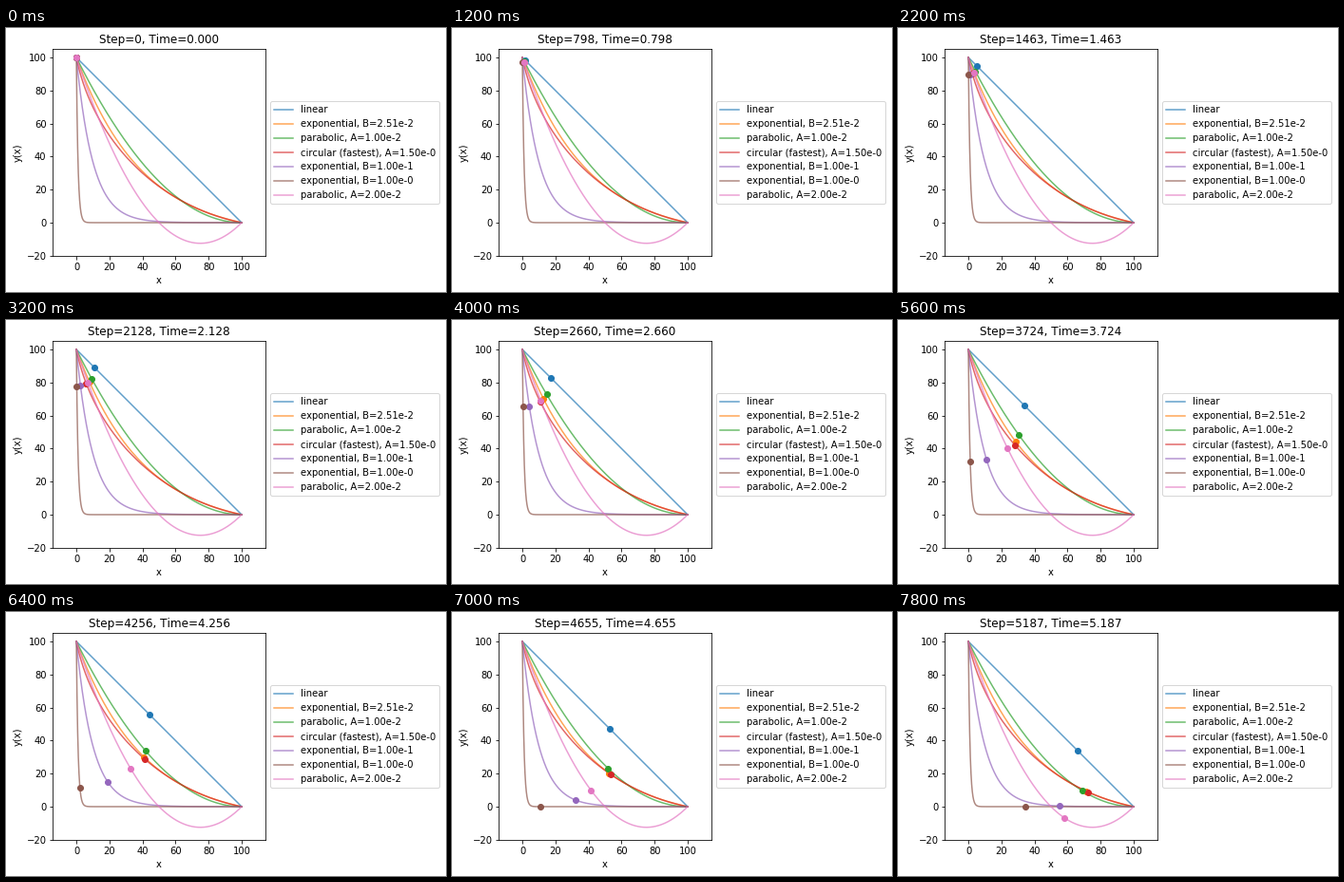
Write a matplotlib script that moves like this. It is 463 px wide and 278 px high and loops after 8000 ms.

```python
import numpy as np
import matplotlib.pyplot as plt
from matplotlib.animation import FuncAnimation

plt.rcParams["text.kerning_factor"] = 6

W, H, DPI = 463, 278, 72
G = 9.81
L = 100.0            # start height and horizontal run
STEPS, DT = 133, 0.001
FRAMES, INTERVAL = 40, 200


def linear(x):
    return L - x


def exponential(b):
    end = np.exp(-b * L)
    return lambda x: L * (np.exp(-b * x) - end) / (1 - end)


def parabolic(a):
    return lambda x: a * x**2 - (1 + a * L) * x + L


def circular(a):
    c = L / 2 * (1 + a)
    r2 = c**2 + (c - L)**2
    return lambda x: c - np.sqrt(r2 - (x - c)**2)


CURVES = [
    ("linear", linear),
    ("exponential, B=2.51e-2", exponential(0.0251)),
    ("parabolic, A=1.00e-2", parabolic(0.01)),
    ("circular (fastest), A=1.50e-0", circular(1.5)),
    ("exponential, B=1.00e-1", exponential(0.1)),
    ("exponential, B=1.00e-0", exponential(1.0)),
    ("parabolic, A=2.00e-2", parabolic(0.02)),
]


def travel(y):
    """Time and x samples of a bead sliding without friction from rest."""
    x = np.linspace(0, np.sqrt(L), 20001)**2
    h = y(x)
    ds = np.hypot(np.diff(x), np.diff(h))
    v = np.sqrt(2 * G * np.maximum(L - h, 0))
    # exact for constant acceleration along each short segment
    t = np.concatenate([[0], np.cumsum(2 * ds / (v[1:] + v[:-1]))])
    return t, x


fig = plt.figure(figsize=((W + 0.01) / DPI, (H + 0.01) / DPI), dpi=DPI,
                 facecolor="white")
ax = fig.add_axes([49.4 / W, 38.23 / H, 223.2 / W, 217.44 / H])
half = 62.5 * 223.2 / 217.44
ax.set_xlim(50 - half, 50 + half)
ax.set_ylim(-20, 105)
ax.set_xticks(range(0, 101, 20))
ax.set_yticks(range(-20, 101, 20))
ax.set_xlabel("x")
ax.set_ylabel("y(x)")
title = ax.set_title("")

xs = np.linspace(0, L, 1001)
for i, (name, y) in enumerate(CURVES):
    ax.plot(xs, y(xs), color=f"C{i}", alpha=0.7, label=name)
beads = [ax.plot([], [], "o", color=f"C{i}")[0] for i in range(len(CURVES))]
paths = [travel(y) for _, y in CURVES]
ax.legend(loc="center left", bbox_to_anchor=(1, 0.5))


def update(frame):
    step = frame * STEPS
    now = step * DT
    title.set_text(f"Step={step}, Time={now:.3f}")
    for bead, (t, x), (_, y) in zip(beads, paths, CURVES):
        pos = np.interp(now, t, x)
        bead.set_data([pos], [y(pos)])
    return [title, *beads]


anim = FuncAnimation(fig, update, frames=FRAMES, interval=INTERVAL,
                     repeat=True, repeat_delay=0, blit=False)
plt.show()
```
